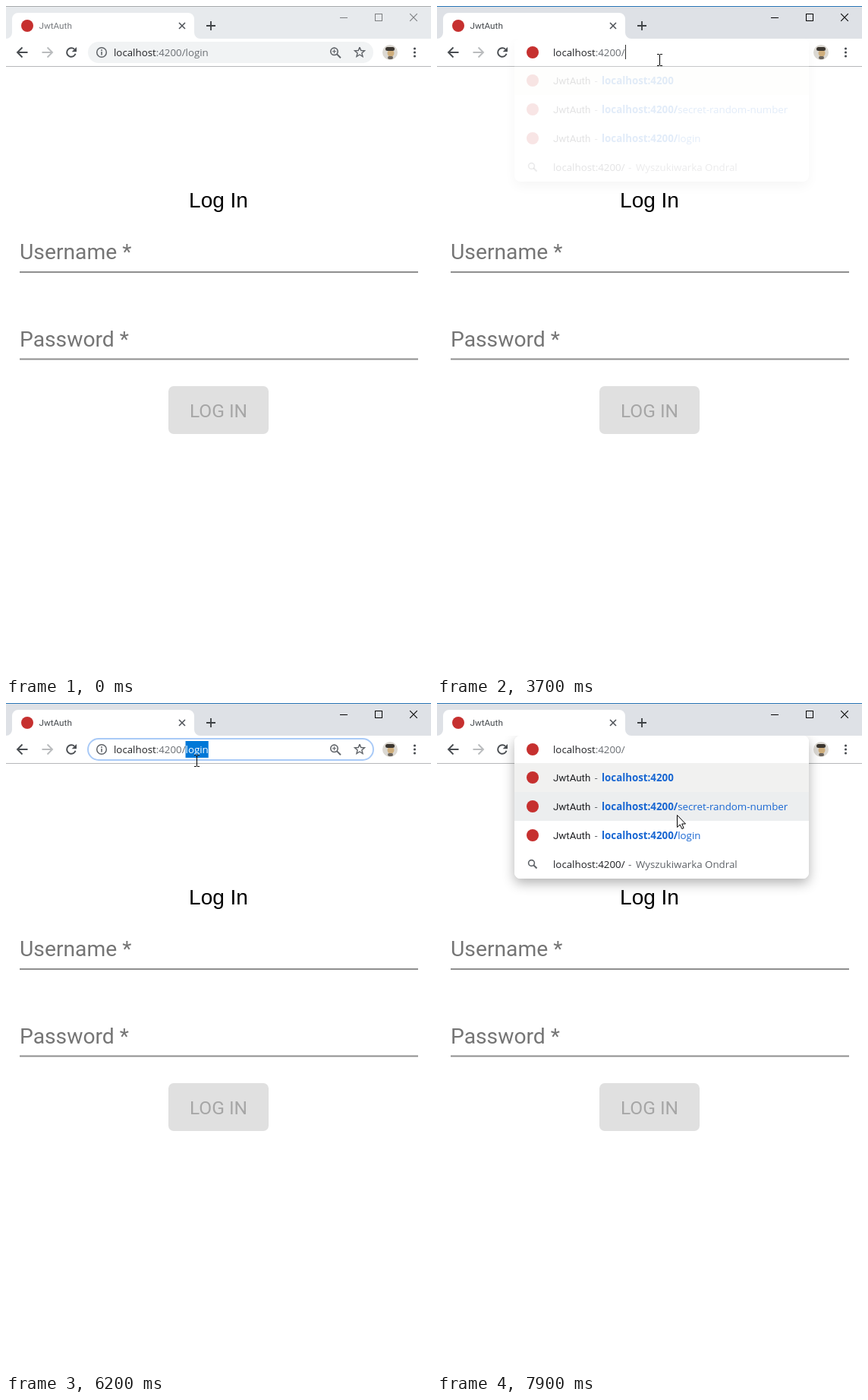
An HTML page with a canvas for the animation above (8 s loop, 560 by 880 pixels).

```html
<!DOCTYPE html>
<html lang="en">
<head>
<meta charset="utf-8">
<title>JwtAuth</title>
<style>
  html, body { margin: 0; width: 100%; height: 100%; overflow: hidden; background: #fff; }
  canvas { display: block; }
</style>
</head>
<body>
<canvas id="stage" width="560" height="880"></canvas>
<script>
const ctx = document.getElementById('stage').getContext('2d');
const LOOP = 8000, STEP = 100, FADE = 300;
const BAR = '13.3px "Open Sans", "Noto Sans", sans-serif', BOLD = '700 ' + BAR;
const ROBOTO = 'Roboto, sans-serif';
const DARK = '#202124', ICON = '#494d51', GRAY = '#5f6368', BLUE = '#1967d2', RED = '#c6302f';
const HOST = 'localhost', PORT = ':4200';
const BASE = 66, ROW = 38;
const POP = { x: 102, y: 43, w: 388, h: 188 };

const ramp = (t, from, span) => Math.min(1, Math.max(0, (t - from) / span));
const mix = (a, b, p) => a + (b - a) * p;

function pointerAt(t) {
  let x = 262, y = 64;
  const glide = (from, to, toX, toY) => {
    const p = ramp(t, from, to - from);
    x = mix(x, toX, p);
    y = mix(y, toY, p);
  };
  glide(2300, 2900, 293, 67);
  glide(2900, 3400, 293, 71);
  glide(4200, 4300, 298, 67);
  glide(5100, 5600, 255, 66);
  glide(5600, 6000, 251, 76);
  glide(6200, 6800, 277, 69);
  glide(7400, 7900, 317, 147);
  return { x: Math.round(x), y: Math.round(y) };
}

function stateAt(t) {
  const within = (a, b) => t >= a && t < b;
  const typing = within(3700, 4200) || t >= 7200;
  const focus = within(2400, 4200) || t >= 5800;
  const opened = t < 4400 ? Math.min(t - 3600, 4400 - t) : t - 7100;
  return {
    t, typing, focus,
    ...pointerAt(t),
    active: t >= 2300,
    hover: ramp(t, t < 2300 ? 1200 : 5100, FADE),
    loading: within(4300, 5100),
    selectAll: within(2400, 2600) || within(5800, 6000),
    tail: within(4200, 5000) ? '' : 'login',
    alpha: ramp(opened, 0, FADE) ** 1.9,
    caret: typing && t < 7700
  };
}

function text(str, x, y, font, color, align = 'left') {
  ctx.font = font;
  ctx.fillStyle = color;
  ctx.textAlign = align;
  ctx.fillText(str, x, y);
  return x + ctx.measureText(str).width;
}

function rect(x, y, w, h, color, r = 0) {
  ctx.fillStyle = color;
  ctx.beginPath();
  ctx.roundRect(x, y, w, h, r);
  ctx.fill();
}

function disc(x, y, r, color) {
  ctx.fillStyle = color;
  ctx.beginPath();
  ctx.arc(x, y, r, 0, 7);
  ctx.fill();
}

function ring(x, y, r, color, width, from = 0, to = Math.PI * 2) {
  ctx.strokeStyle = color;
  ctx.lineWidth = width;
  ctx.beginPath();
  ctx.arc(x, y, r, from, to);
  ctx.stroke();
}

function lines(color, width, ...paths) {
  ctx.strokeStyle = color;
  ctx.lineWidth = width;
  ctx.beginPath();
  for (const p of paths)
    for (let i = 0; i < p.length; i += 2) ctx[i ? 'lineTo' : 'moveTo'](p[i], p[i + 1]);
  ctx.stroke();
}

function cross(x, y, r, color, width) {
  lines(color, width, [x - r, y - r, x + r, y + r], [x - r, y + r, x + r, y - r]);
}

function field(label, y) {
  text(label, 18, y, '28.25px ' + ROBOTO, '#757575');
  rect(18, y + 16, 525, 2, '#8f8f8f');
}

function page() {
  rect(0, 0, 560, 880, '#fff');
  text('Log In', 280, 265, '28px "Liberation Sans", Arial, sans-serif', '#000', 'center');
  field('Username *', 333);
  field('Password *', 447.5);
  rect(214, 500, 132, 63, '#e0e0e0', 7);
  text('LOG IN', 280, 541, '24.5px ' + ROBOTO, '#a6a6a6', 'center');
}

function tabs(s) {
  rect(0, 0, 560, 43, s.active ? '#dee1e6' : '#e7eaed');
  rect(0, 0, 560, 1, s.active ? '#2b78b8' : '#a9abad');
  ctx.fillStyle = '#fff';
  ctx.beginPath();
  ctx.moveTo(0, 43);
  ctx.arcTo(8, 43, 8, 9, 8);
  ctx.arcTo(8, 9, 248, 9, 8);
  ctx.arcTo(248, 9, 248, 43, 8);
  ctx.arcTo(248, 43, 256, 43, 8);
  ctx.fill();

  if (s.loading) spinner(s.t - 4300);
  else disc(28, 26, 8, RED);
  text('JwtAuth', 43.5, 30, '11.7px ' + ROBOTO, s.active ? '#45494d' : '#787b7f');
  cross(232, 26, 4, '#50545a', 1.6);
  lines('#3c4043', 1.8, [264, 26, 276, 26], [270, 20, 270, 32]);

  const color = s.active ? '#000' : '#7c7e80';
  lines(color, 1, [440, 15.5, 450, 15.5]);
  ctx.strokeRect(486.5, 10.5, 9, 9);
  cross(537, 15, 4.8, color, 1.1);
}

// Gray arc grows backwards while waiting, then a blue one runs forwards
function spinner(age) {
  const turn = (age - 400) / 160 - Math.PI / 2;
  if (age >= 400) return ring(28, 26, 6.8, '#1a73e8', 1.8, turn, turn + 2.6);
  const head = -1.75 - age / 200;
  ring(28, 26, 6.8, '#80868b', 1.6, head, head + .2 + age / 400);
}

function arrow(x, dir, color) {
  const tip = x - 7 * dir, wing = x - .5 * dir;
  lines(color, 1.9, [tip, 61, x + 6.5 * dir, 61], [wing, 54.5, tip, 61, wing, 67.5]);
}

function reload() {
  ring(86, 61, 5.8, ICON, 1.9, .3, 5.5);
  ctx.fillStyle = ICON;
  ctx.beginPath();
  ctx.moveTo(93, 54);
  ctx.lineTo(93, 60.3);
  ctx.lineTo(86.7, 60.3);
  ctx.fill();
}

function magnifier(x, y, r) {
  ring(x, y, r, GRAY, 1.6);
  lines(GRAY, 1.9, [x + r * .7, y + r * .7, x + r * 1.8, y + r * 1.8]);
}

function star(x, y) {
  const pts = [];
  for (let i = 0; i <= 10; i++) {
    const a = i * Math.PI / 5 - Math.PI / 2, r = i % 2 ? 3 : 6.8;
    pts.push(x + r * Math.cos(a), y + r * Math.sin(a));
  }
  lines(GRAY, 1.4, pts);
}

function avatar() {
  disc(506, 61, 10, '#dbd8d2');
  disc(507, 62, 4.5, '#cfae7c');
  rect(500, 54, 12, 5, '#3b3630', 2.5);
  rect(503, 66, 7, 4, '#6b655e', 2);
}

function url(x, tail) {
  const port = text(HOST, x, BASE, BAR, DARK);
  return text(PORT + tail, port, BASE, BAR, '#6b6f74');
}

function highlight(from, to, str) {
  rect(from, 50, to - from, 22, '#0078d7');
  text(str, from, BASE, BAR, '#fff');
}

function addressBar(s) {
  const shade = v => Math.round(mix(v, v - 9, s.hover));
  rect(108, 47, 376, 28, s.focus ? '#fff' : `rgb(${shade(241)},${shade(243)},${shade(244)})`, 14);
  if (s.focus) {
    ctx.strokeStyle = '#a9caf7';
    ctx.lineWidth = 2;
    ctx.stroke();
  }
  ring(126, 61, 6.3, GRAY, 1.5);
  rect(125.2, 60, 1.6, 4.5, GRAY);
  rect(125.2, 57.3, 1.6, 1.6, GRAY);
  magnifier(432.5, 59.8, 4.7);
  lines(GRAY, 1.1, [430, 59.8, 435, 59.8], [432.5, 57.3, 432.5, 62.3]);
  star(466, 61);

  const end = url(142, s.tail && '/' + s.tail);
  if (!s.focus) return;
  if (s.selectAll) highlight(142, end, HOST + PORT + '/' + s.tail);
  else highlight(end - ctx.measureText(s.tail).width, end, s.tail);
}

function toolbar(s) {
  rect(0, 43, 560, 36, '#fff');
  rect(0, 79, 560, 1, '#b6b8ba');
  arrow(22, 1, ICON);
  arrow(54, -1, '#babcbe');
  if (s.loading) cross(86, 61, 5, ICON, 1.9);
  else reload();
  avatar();
  for (let i = -1; i <= 1; i++) disc(538.5, 61 + 5 * i, 1.6, ICON);
  if (!s.typing) addressBar(s);
}

// The shadow is kept outside the panel so that it does not tint a half-faded one
function shadow() {
  ctx.save();
  ctx.beginPath();
  ctx.rect(0, POP.y, 560, 300);
  ctx.roundRect(POP.x, POP.y, POP.w, POP.h, 8);
  ctx.clip('evenodd');
  ctx.shadowColor = 'rgba(0,0,0,.3)';
  ctx.shadowBlur = 16;
  ctx.shadowOffsetY = 6;
  rect(POP.x, POP.y, POP.w, POP.h, '#fff', 8);
  ctx.restore();
}

function popup(s) {
  if (!s.alpha) return;
  const top = s.typing ? POP.y : 80;
  ctx.save();
  ctx.beginPath();
  ctx.rect(0, top, 560, 300);
  ctx.clip();
  ctx.globalAlpha = s.alpha;
  shadow();
  rect(POP.x, POP.y, POP.w, POP.h, '#fff', 8);
  rect(POP.x, 79, POP.w, ROW, '#f1f1f0');
  if (s.y >= 79 + ROW) rect(POP.x, 79 + ROW, POP.w, ROW, '#eceeef');

  ['', '/secret-random-number', '/login'].forEach((path, i) => {
    const y = 103 + i * ROW;
    disc(126, y - 5, 8, RED);
    text('JwtAuth', 153, y, '13.3px ' + ROBOTO, DARK);
    text('-', 207.5, y, BAR, GRAY);
    const end = text(HOST + PORT + path.slice(0, 1), 217, y, BOLD, BLUE);
    text(path.slice(1), end, y, BAR, BLUE);
  });
  magnifier(124.5, 210.5, 3.9);
  text(HOST + PORT + '/', 153, 217, BAR, DARK);
  text('-', 252, 217, BAR, GRAY);
  text('Wyszukiwarka Ondral', 262, 217, BAR, GRAY);
  ctx.restore();

  if (s.typing) {
    disc(126, 61, 8, RED);
    const end = url(153, '/');
    if (s.caret) rect(Math.round(end), 51, 1, 19, '#333');
  }
}

function beam(x, y) {
  lines('#000', 1, [x + .5, y - 7, x + .5, y + 7]);
  for (const end of [y - 7.5, y + 7.5])
    lines('#000', 1, [x - 3, end, x, end], [x + 1, end, x + 4, end]);
}

function hand(x, y) {
  ctx.save();
  ctx.translate(x - .5, y + .5);
  ctx.fillStyle = '#fff';
  const shape = new Path2D('M0 0V16L3.7 12.5 6.3 18 8.6 17 6.2 11.5H11Z');
  ctx.fill(shape);
  ctx.strokeStyle = '#000';
  ctx.lineWidth = 1;
  ctx.stroke(shape);
  ctx.restore();
}

function draw(now) {
  const s = stateAt(Math.floor(now % LOOP / STEP) * STEP);
  page();
  tabs(s);
  toolbar(s);
  popup(s);
  if (s.active) (s.y < 80 ? beam : hand)(s.x, s.y);
}

const start = performance.now();
function tick() {
  draw(performance.now() - start);
  requestAnimationFrame(tick);
}
tick();
</script>
</body>
</html>
```
